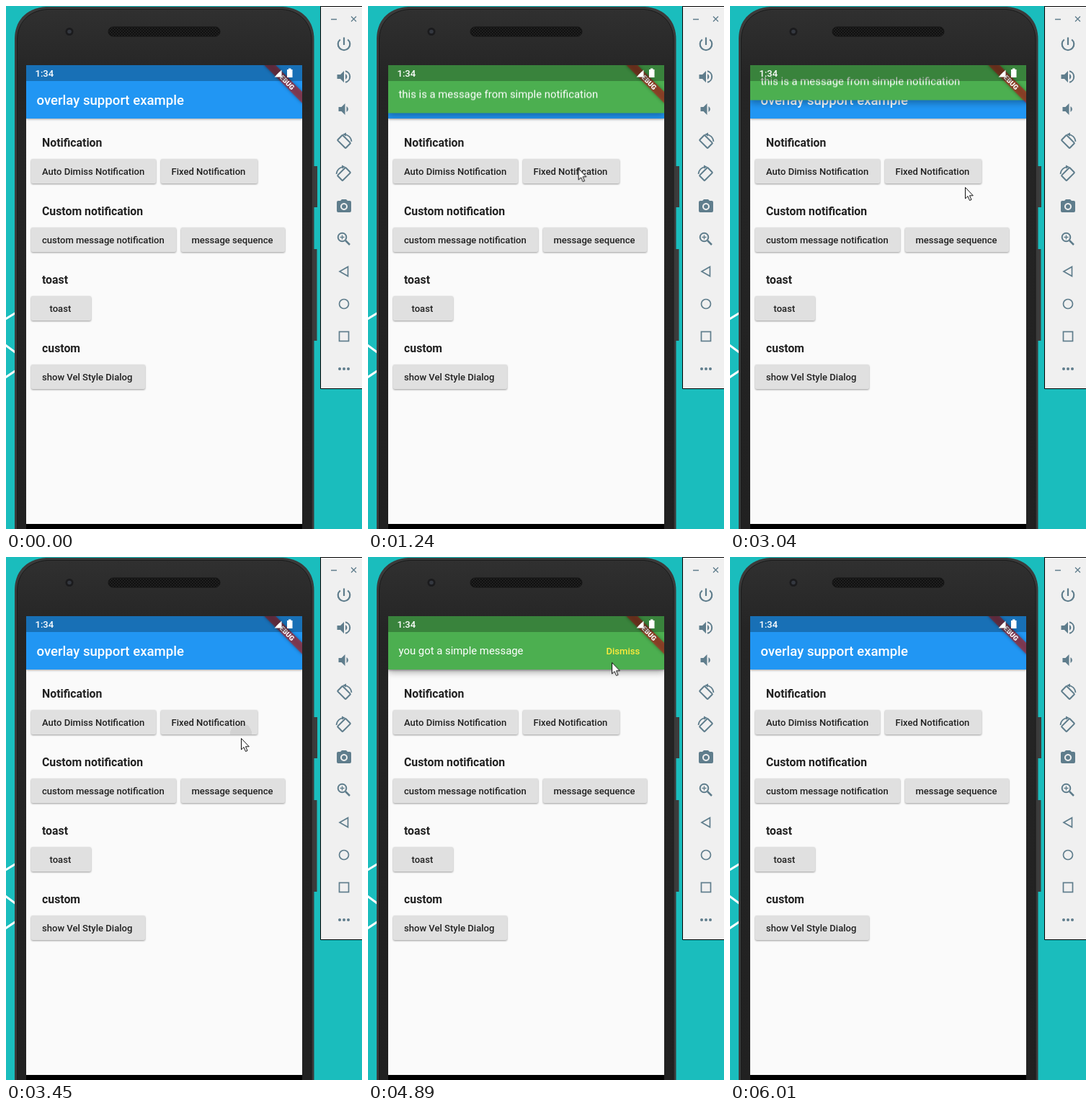
Recreate the animation shown at these times as an HTML page. Size 494x725 px, loop 6.42 s.

```html
<!DOCTYPE html>
<html lang="en">
<head>
<meta charset="utf-8">
<title>Overlay support demo</title>
<style>
html, body { margin: 0; width: 100%; height: 100%; overflow: hidden; background: #1abdbd; }
svg { display: block; }
text { font-family: Roboto, sans-serif; font-size: 13.05px; font-weight: 500; fill: #212121; }
.heading { font-size: 15.84px; font-weight: 700; }
.title { font-size: 18.6px; fill: #fff; }
.message { font-size: 14.88px; font-weight: 400; fill: #fff; }
.button { fill: #e0e0e0; filter: drop-shadow(0 1px 1px rgba(0, 0, 0, .38)); }
.appbar { filter: drop-shadow(0 1.5px 1.5px rgba(0, 0, 0, .35)); }
.sheet { fill: #4caf50; filter: drop-shadow(0 4px 5px rgba(0, 0, 0, .3)); }
.icons { fill: none; stroke: #5f7d8c; stroke-width: 2; }
.icons .solid { fill: #5f7d8c; stroke: none; }

.cursor, .first, .second { animation: 6420ms linear infinite; }
.cursor { animation-name: point; }
.first { animation-name: first; }
.second { animation-name: second; }
.ripple { opacity: 0; transform-box: fill-box; transform-origin: center; animation: ripple 6420ms linear infinite; }

@keyframes ripple {
  0%, 1.9% { opacity: 1; transform: scale(1); animation-timing-function: ease-out; }
  4.6% { opacity: 1; transform: scale(10); }
  9%, 100% { opacity: 0; transform: scale(10); }
}
@keyframes first {
  0%, 14.79% { transform: translateY(-130px); }
  14.8% { transform: translateY(-74px); animation-timing-function: ease; }
  22.12% { transform: none; }
  41.59% { transform: none; animation-timing-function: cubic-bezier(.75, 0, .75, .9); }
  50.93% { transform: translateY(-74px); }
  50.94%, 100% { transform: translateY(-130px); }
}
@keyframes second {
  0%, 60.56% { transform: translateY(-130px); }
  60.57% { transform: translateY(-74px); animation-timing-function: ease; }
  67.89% { transform: none; }
  82.09% { transform: none; animation-timing-function: cubic-bezier(.75, 0, .75, .9); }
  91.43% { transform: translateY(-74px); }
  91.44%, 100% { transform: translateY(-130px); }
}
@keyframes point {
  0%, .46% { transform: translate(520px, 740px); }
  .47% { transform: translate(374px, 643px); animation-timing-function: cubic-bezier(.3, .2, .4, 1); }
  8.57%, 12.9% { transform: translate(133px, 227px); animation-timing-function: ease-in; }
  15.73% { transform: translate(144px, 239px); animation-timing-function: cubic-bezier(.4, .2, .5, 1); }
  21.34%, 22.4% { transform: translate(323px, 222px); }
  24.92%, 28% { transform: translate(326px, 242px); }
  28.66% { transform: translate(326px, 243px); }
  31.62%, 34.6% { transform: translate(326px, 246px); }
  35.2%, 41.59% { transform: translate(326px, 247px); }
  47.35%, 57.6% { transform: translate(326px, 251px); }
  61.06% { transform: translate(340px, 273px); }
  62.62% { transform: translate(346px, 283px); }
  66.98%, 70.8% { transform: translate(352px, 285px); animation-timing-function: ease-in-out; }
  76.17% { transform: translate(338px, 146px); animation-timing-function: ease-out; }
  80.3%, 83.5% { transform: translate(349px, 120px); animation-timing-function: cubic-bezier(.4, .1, .6, .9); }
  92.06% { transform: translate(448px, 702px); }
  92.99%, 93.6% { transform: translate(446px, 706px); }
  93.61%, 100% { transform: translate(520px, 740px); }
}
</style>
</head>
<body>
<svg width="494" height="725" viewBox="0 0 494 725">
  <defs>
    <linearGradient id="face" x2="0" y2="1">
      <stop stop-color="#303030"/><stop offset=".13" stop-color="#252525"/><stop offset="1" stop-color="#212121"/>
    </linearGradient>
    <pattern id="mesh" width="4" height="4" patternUnits="userSpaceOnUse">
      <path fill="#111" d="M0 0h4v4H0z"/><path fill="#292929" d="M0 0h1.5v1.5H0zM2 2h1.5v1.5H2z"/>
    </pattern>
    <clipPath id="screen"><path d="M28 82H411V718H28z"/></clipPath>
    <clipPath id="autoArea"><rect x="35" y="212" width="173" height="34" rx="2"/></clipPath>
    <clipPath id="fixedArea"><rect x="215" y="212" width="134" height="34" rx="2"/></clipPath>
    <clipPath id="dismissArea"><path d="M316 104H393V156H316z"/></clipPath>
  </defs>

  <path fill="#1abdbd" d="M0 0H494V725H0z"/>
  <path stroke="#fff" stroke-width="3" d="M-1 434L14 425M-1 470L14 481M-1 515L14 505"/>

  <!-- Phone -->
  <path fill="#3c3c3c" d="M426 222h6v57h-6zM426 337h5.500v127h-5.500z"/>
  <path fill="#3a3a3a" d="M12 725V46C12 22 26 3 56 1H384C413 3 427.500 22 427.500 46V725z"/>
  <path fill="url(#face)" stroke="#1a1a1a" d="M15.500 726V48C15.500 24 30 7 57 4.500H383C409 7 424 24 424 48V726z"/>
  <circle cx="88" cy="35.500" r="5.500" fill="#1b1b1d"/>
  <circle cx="88" cy="35.500" r="2.800" fill="#343840"/>
  <rect x="142" y="29" width="155" height="13" rx="6.500" fill="url(#mesh)" stroke="#151515"/>
  <path d="M28 717H411V725H28z"/>

  <g clip-path="url(#screen)">
    <path fill="#fafafa" d="M28 82H411V718H28z"/>
    <path class="appbar" fill="#2196f3" d="M28 82H411V156H28z"/>
    <text class="title" x="42.500" y="137">overlay support example</text>

    <text class="heading" x="50" y="195">Notification</text>
    <text class="heading" x="50" y="290">Custom notification</text>
    <text class="heading" x="50" y="385">toast</text>
    <text class="heading" x="50" y="480">custom</text>
    <g class="button">
      <rect x="35" y="212" width="173" height="34" rx="2"/>
      <rect x="215" y="212" width="134" height="34" rx="2"/>
      <rect x="35" y="307" width="201" height="34" rx="2"/>
      <rect x="243" y="307" width="144" height="34" rx="2"/>
      <rect x="35" y="402" width="83" height="34" rx="2"/>
      <rect x="35" y="497" width="158" height="34" rx="2"/>
    </g>
    <g fill="#000" fill-opacity=".06">
      <g clip-path="url(#autoArea)"><circle class="ripple" style="animation-delay:690ms" cx="133" cy="228" r="15"/></g>
      <g clip-path="url(#fixedArea)"><circle class="ripple" style="animation-delay:3420ms" cx="326" cy="245" r="15"/></g>
    </g>
    <text x="50" y="233.500">Auto Dimiss Notification</text>
    <text x="229.500" y="233.500">Fixed Notification</text>
    <text x="50" y="328.500">custom message notification</text>
    <text x="257.500" y="328.500">message sequence</text>
    <text x="60.500" y="423.500">toast</text>
    <text x="50" y="518.500">show Vel Style Dialog</text>

    <g class="first">
      <path class="sheet" d="M28 82H411V156H28z"/>
      <text class="message" x="42.500" y="135">this is a message from simple notification</text>
    </g>
    <g class="second">
      <path class="sheet" d="M28 82H411V156H28z"/>
      <text class="message" x="42.500" y="135">you got a simple message</text>
      <g clip-path="url(#dismissArea)"><circle class="ripple" style="animation-delay:5180ms" cx="349" cy="120" r="15" fill="#c8c8c8" fill-opacity=".35"/></g>
      <text x="330.500" y="135" style="fill:#ffeb3b">Dismiss</text>
    </g>

    <g transform="translate(411 82) rotate(45)">
      <path fill="#b71c1c" fill-opacity=".63" style="filter:drop-shadow(0 0 2px rgba(0,0,0,.5))" d="M-38 26.100H38V37.300H-38z"/>
      <text x="-1" y="35" text-anchor="middle" style="font-size:9.5px;font-weight:900;fill:#fff">DEBUG</text>
    </g>
    <path fill-opacity=".25" d="M28 82H411V104H28z"/>
    <text x="40.500" y="98" style="fill:#fff">1:34</text>
    <path fill="#fff" d="M372.500 98.500L382.500 88.500V98.500zM390 88h2v-1.500h3.500V88H397.500V99H390z"/>
  </g>

  <!-- Emulator toolbar -->
  <path fill="#f0f0f0" stroke="#000" d="M436.500 .5H495V530.500H436.500z"/>
  <g class="icons">
    <path stroke-width="1.300" d="M451 18.500h8M479 14.500l7 7M486 14.500l-7 7"/>
    <g transform="translate(469 53)">
      <path stroke-width="2.200" d="M0-9.500V1M-5.200-6.500A8.300 8.300 0 1 0 5.200-6.500"/>
    </g>
    <g transform="translate(469 98)">
      <path class="solid" d="M-9.500-3V3H-5L0 8V-8L-5-3zM2-4A4.500 4.500 0 0 1 2 4z"/>
      <path d="M2-7.800A8 8 0 0 1 2 7.800"/>
    </g>
    <g transform="translate(469 143)">
      <path class="solid" d="M-7.500-3V3H-3.500L1.500 8V-8L-3.500-3zM3.500-4A4.500 4.500 0 0 1 3.500 4z"/>
    </g>
    <g id="rotate" transform="translate(469 188)">
      <rect x="-5" y="-8" width="10" height="16" rx="1" transform="rotate(-45)"/>
      <path stroke-width="1.600" d="M0-10A10.500 10.500 0 0 1 10.500 0"/>
      <path class="solid" d="M-2-10L3-12.500V-7.500z"/>
    </g>
    <use href="#rotate" transform="matrix(-1 0 0 1 938 45)"/>
    <g transform="translate(469 277)">
      <path class="solid" fill-rule="evenodd" d="M-8-7H-5L-3-9H3L5-7H8Q10-7 10-5V7Q10 9 8 9H-8Q-10 9-10 7V-5Q-10-7-8-7zM0-4A5 5 0 1 0 .01-4z"/>
      <circle class="solid" cy="1" r="3"/>
    </g>
    <g transform="translate(468.500 322.500)">
      <circle cx="-2" cy="-2" r="5.800"/>
      <path d="M2.500 2.500L8.500 8.500" stroke-width="2.500"/>
      <path stroke-width="1.300" d="M-5-2H1M-2-5V1"/>
    </g>
    <path stroke-width="1.700" d="M474.500 361.500V374.500L463 368z"/>
    <circle stroke-width="1.700" cx="469" cy="413" r="6.500"/>
    <rect stroke-width="1.700" x="462.500" y="451.500" width="13" height="13"/>
    <path stroke-width="4" stroke-linecap="round" d="M463 503h.01M469 503h.01M475 503h.01"/>
  </g>

  <path class="cursor" fill="#fff" stroke="#111" stroke-linejoin="round" d="M.5 .5V16L4 12.700L6.500 18.500L9 17.500L6.500 11.800H11.300z"/>
</svg>
</body>
</html>
```
